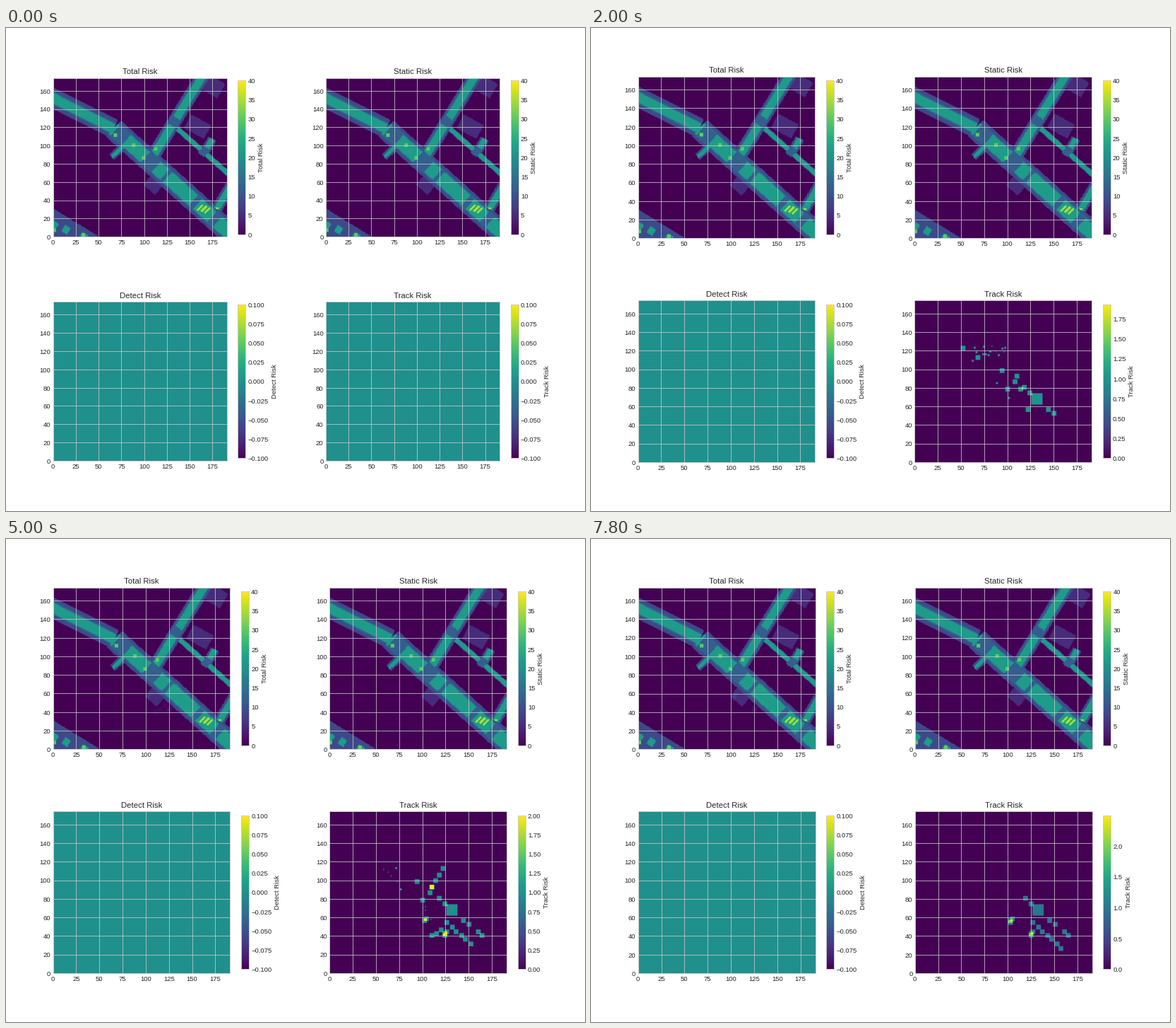
A matplotlib script that plays this animation: 820x683 px, repeating every 8 s.

```python
import numpy as np
import matplotlib.pyplot as plt
from matplotlib.animation import FuncAnimation

ROWS, COLS = 174, 191
STEPS = 40
GREY, INK = "0.8", "0.15"
PLOT, WALK, CROSSING, ROAD, HOT, STRIPE = 5, 9, 12, 22, 30, 35

plt.rcParams.update({
    "font.family": "Liberation Sans", "font.size": 10,
    "axes.edgecolor": GREY, "axes.linewidth": 1, "axes.labelcolor": INK,
    "axes.grid": True, "axes.axisbelow": True,
    "grid.color": GREY, "grid.linewidth": 0.8, "text.color": INK,
    "xtick.color": INK, "ytick.color": INK,
    "xtick.major.size": 0, "ytick.major.size": 0,
    "image.cmap": "viridis", "image.origin": "lower",
})

# Streets: both ends, half width with sidewalk, half width of the roadway
STREETS = [
    ((-5, 154), (66, 118), 10.5, 5.2),
    ((66, 118), (200, -2), 12, 7.5),
    ((108, 86), (165, 178), 7.5, 4.2),
    ((136, 118), (198, 63), 3, 2.4),
    ((166, 92), (174, 107), 5, 3),
    ((179, 30), (198, 62), 6, 3.5),
    ((64, 87), (79, 101), 4, 2),
    ((-20, 23), (55, -23), 17, 0),
]
PLOTS = [((147, 126), (169, 114.5), 8.5), ((167, 169), (184, 159), 9),
         ((103, 62), (116, 51), 7)]
# Crossings: centre, half length along the main street, half width
CUTS = [((74, 111), 8, 8), ((107, 82), 8, 9), ((123, 66), 2, 9), ((156, 38), 3, 9),
        ((177, 19), 4, 9), ((132, 126), 5, 5), ((165, 93), 4, 5)]
HOT_SPOTS = [(68, 111), (88, 100), (99, 86), (112, 96), (33, 2), (1, 7)]

# Rows of vehicles: first place, last place, count, first step, last step
QUEUES = [
    ((53, 123), (68, 112), 2, 3, 17),
    ((95, 98), (100, 79), 2, 2, 31),
    ((111, 93), (108, 87), 2, 2, 31),
    ((119, 80), (124, 75), 2, 4, 39),
    ((144, 57), (150, 52), 2, 2, 39),
    ((114, 78), (123, 57), 2, 7, 18),
    ((111, 93), (122, 112), 4, 12, 31),
    ((124, 40), (126, 45), 3, 12, 39),
    ((120, 46), (111, 40), 3, 13, 33),
    ((127, 54), (157, 27), 7, 15, 39),
    ((104, 58), (102, 54), 3, 22, 39),
    ((160, 44), (164, 40), 2, 21, 39),
]

# Top of the track colour scale from a given step on
SCALES = [(2, 2), (9, 1.93), (13, 1.54), (17, 2), (27, 3), (38, 2.49)]


def strip(grid, start, end, half, level):
    y, x = np.mgrid[:ROWS, :COLS] + 0.5
    span = np.subtract(end, start)
    length = np.hypot(*span)
    dx, dy = span / length
    along = (x - start[0]) * dx + (y - start[1]) * dy
    across = (y - start[1]) * dx - (x - start[0]) * dy
    grid[(along >= 0) & (along <= length) & (abs(across) < half)] = level


def street_map():
    grid = np.zeros((ROWS, COLS))
    for start, end, half in PLOTS:
        strip(grid, start, end, half, PLOT)
    for start, end, walk, road in STREETS:
        strip(grid, start, end, walk, WALK)
    for start, end, walk, road in STREETS:
        strip(grid, start, end, road + (road > 4) * 1.5, CROSSING)
    for start, end, walk, road in STREETS:
        strip(grid, start, end, road, ROAD)
    way = np.array([0.745, -0.667])
    for centre, reach, half in CUTS:
        strip(grid, centre - reach * way, centre + reach * way, half, CROSSING)
    for x in (1, 14, 33):
        strip(grid, (x - 3, 15 - 0.4 * x), (x + 3, 11 - 0.4 * x), 4, ROAD)
    for x, y in HOT_SPOTS:
        strip(grid, (x - 2, y), (x + 2, y), 2, HOT)
    for k in range(3):
        x, y = 158 + 4 * k, 29 - 1.5 * k
        strip(grid, (x, y), (x + 6, y + 6), 1.1, STRIPE)
    strip(grid, (178, 31), (181, 31), 1.5, STRIPE)
    return grid


def make_walkers(count=26):
    """Half keep to the southern sidewalk, half roam north of the street."""
    rng = np.random.default_rng(4)
    walkers = []
    for i in range(count):
        x = rng.uniform(54, 106)
        y = 171 - x + rng.normal(0, 1.5)
        first, life = rng.uniform(2, 18), rng.uniform(9, 20)
        if i % 2:
            x, y = rng.uniform(62, 99), rng.uniform(113, 128)
            first = rng.uniform(2, 8)
        speed = rng.uniform(-0.4, 0.4)
        walkers.append((x, y, speed, rng.integers(1, 3), first, first + life))
    return walkers


def stamp(grid, x, y, size):
    c, r = round(x - size / 2), round(y - size / 2)
    grid[r:r + size, c:c + size] += 1


def track_map(step):
    grid = np.zeros((ROWS, COLS))
    stamp(grid, 132.5, 68, 12)
    for start, end, count, first, last in QUEUES:
        for k, (x, y) in enumerate(np.linspace(start, end, count)):
            if first + 2 * k <= step <= last:
                stamp(grid, x, y, 5)
    for x, y, speed, size, first, last in WALKERS:
        if first <= step <= last:
            move = speed * (step - first)
            stamp(grid, x + move, y - move, size)
    return grid


def panel(ax, name, data, low, high):
    im = ax.imshow(data, vmin=low, vmax=high, extent=(0, COLS, 0, ROWS))
    ax.set_title(name)
    bar = fig.colorbar(im, ax=ax, shrink=0.8)
    bar.set_label(name)
    bar.ax.grid(False)
    return im


WALKERS = make_walkers()
streets = street_map()
empty = np.zeros((ROWS, COLS))

fig, axes = plt.subplots(2, 2, figsize=(12, 10), dpi=820 / 12, facecolor="white")
total_im = panel(axes[0, 0], "Total Risk", streets, 0, 40)
panel(axes[0, 1], "Static Risk", streets, 0, 40)
panel(axes[1, 0], "Detect Risk", empty, -0.1, 0.1)
track_im = panel(axes[1, 1], "Track Risk", empty, -0.1, 0.1)


def update(step):
    low, high, tracks = -0.1, 0.1, empty
    if step >= SCALES[0][0]:
        low, tracks = 0, track_map(step)
        high = [top for first, top in SCALES if first <= step][-1]
    total_im.set_data(streets + tracks)
    track_im.set_data(tracks)
    track_im.set_clim(low, high)
    # refit from the same start, as label widths change with the scale
    fig.subplots_adjust(left=0.125, right=0.9, bottom=0.11, top=0.88,
                        wspace=0.2, hspace=0.2)
    fig.tight_layout(pad=5)
    return total_im, track_im


anim = FuncAnimation(fig, update, frames=STEPS, interval=200, blit=False,
                     repeat=True, repeat_delay=0)
plt.show()
```
